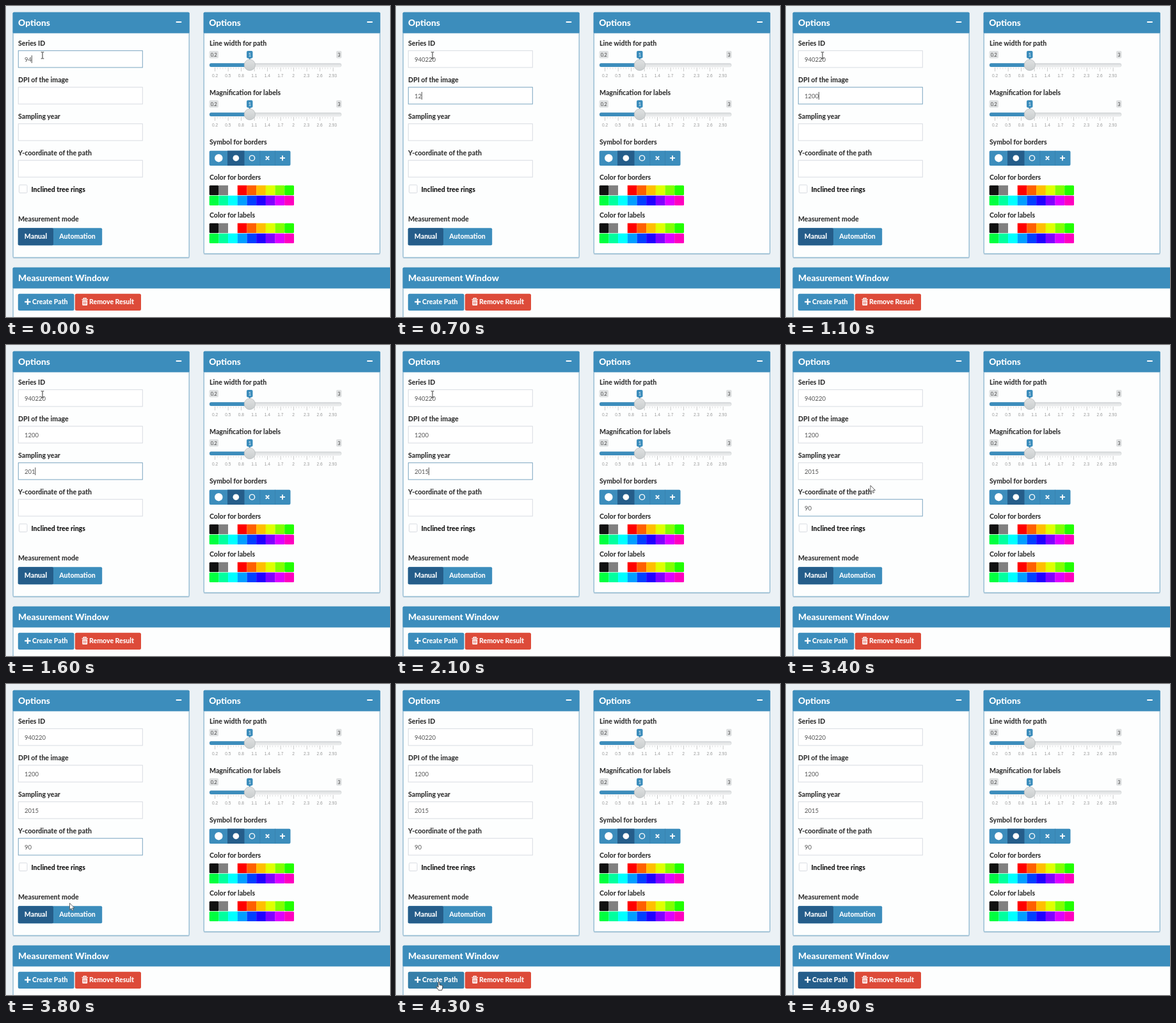
An HTML page that plays this animation: 600x485 px, repeating every 5 s.

```html
<!DOCTYPE html>
<html lang="en">
<head>
<meta charset="utf-8">
<title>Measurement options</title>
<style>
  html, body { margin: 0; width: 100%; height: 100%; overflow: hidden; background: #ebf1f5; }
  svg { display: block; width: 600px; height: 485px; }
  text { font: 800 10.55px Lato, "Open Sans", sans-serif; fill: #333; }
  .head { font-size: 13.8px; fill: #fff; }
  .light { fill: #fff; }
  .mid { text-anchor: middle; }
  .value { font-weight: 400; font-size: 9.5px; fill: #555; }
  .badge { font-weight: 400; font-size: 7.3px; fill: #444; }
  .tick { font: 400 6.6px "Liberation Sans", Arial, sans-serif; fill: #999; }
</style>
</head>
<body>
<svg id="stage" viewBox="0 0 600 485">
  <defs>
    <linearGradient id="knob" x2="0" y2="1">
      <stop offset="0" stop-color="#e0e2e2"/><stop offset="1" stop-color="#c9cdce"/>
    </linearGradient>
    <linearGradient id="rail" x2="0" y2="1">
      <stop offset="0" stop-color="#d3d6d8"/><stop offset="1" stop-color="#f3f4f4"/>
    </linearGradient>
  </defs>
</svg>
<script>
const NS = 'http://www.w3.org/2000/svg';
const stage = document.getElementById('stage');
const BLUE = '#3c8dbc', DARK = '#255d8a', HOVER = '#367fa9', LOOP = 5000;

function add(tag, attrs, parent = stage) {
  const el = document.createElementNS(NS, tag);
  for (const k in attrs) el.setAttribute(k, attrs[k]);
  return parent.appendChild(el);
}
const rect = (x, y, width, height, fill, more) => add('rect', { x, y, width, height, fill, ...more });
const path = (d, more, parent) => add('path', { d, fill: 'none', ...more }, parent);
function text(x, y, str, cls = '') {
  const el = add('text', { x, y, class: cls });
  el.textContent = str;
  return el;
}

function panel(x, y, w, h, title) {
  rect(x, y + 1, w, h, '#c3d3df', { rx: 1.5 });
  rect(x + .5, y + .5, w - 1, h - 1, '#fdfefe', { rx: 1.5, stroke: '#78abc8' });
  rect(x, y, w, 32.8, BLUE, { rx: 1.5 });
  text(x + 8.5, y + 21.2, title, 'head');
}
const minus = x => rect(x, 24, 8.5, 2, '#fff');

panel(10.6, 9.7, 276, 383, 'Options');
panel(308.7, 9.7, 276, 377, 'Options');
panel(10.6, 407.7, 620, 120, 'Measurement Window');
minus(265.7);
minus(564.2);

// Form fields
const fields = ['Series ID', 'DPI of the image', 'Sampling year', 'Y-coordinate of the path'].map((name, i) => {
  const top = 69.7 + i * 57;
  text(19, top - 8, name);
  return {
    top,
    box: rect(19.3, top, 194, 26.2, '#fff'),
    value: text(29, top + 17, '', 'value'),
    caret: rect(0, top + 7.3, 1, 12, '#555')
  };
});

rect(20.5, 279, 12.5, 12.5, '#fff', { rx: 1.5, stroke: '#d8dbe1' });
text(39.5, 290, 'Inclined tree rings').style.fill = '#111';
text(19, 336, 'Measurement mode');
rect(18.8, 346.3, 131.4, 27, BLUE, { rx: 2 });
rect(18.8, 346.3, 55.2, 27, DARK, { rx: 2 });
text(46.5, 363.4, 'Manual', 'light mid');
text(111.5, 363.4, 'Automation', 'light mid');

// Sliders
function slider(y, name) {
  text(318, y - 30, name);
  const badge = (x, w, str, fill) => {
    rect(x, y - 22, w, 11.5, fill, { rx: 2 });
    return text(x + w / 2, y - 13.5, str, 'badge mid');
  };
  badge(317.5, 14.5, '0.2', '#dfe1e2');
  badge(516, 8.5, '3', '#dfe1e2');
  badge(376, 9.5, '1', BLUE).style.fill = '#fff';
  path(`M378.5 ${y - 11}h4.5l-2.2 2.5z`, { fill: BLUE });
  rect(318, y - 2.5, 206, 5.3, 'url(#rail)', { rx: 2.5, stroke: '#d0d3d5', 'stroke-width': .6 });
  rect(318, y - 2.8, 62, 5.8, BLUE, { rx: 2.5 });
  for (let i = 0; i <= 45; i++) {
    const big = i % 5 === 0;
    rect(326.3 + i * 4.1, y + 4, .6, big ? 6 : 2.5, big ? '#aaa' : '#ccc');
  }
  '0.2 0.5 0.8 1.1 1.4 1.7 2 2.3 2.6 2.93'.split(' ').forEach((n, i) =>
    text(326.5 + i * 20.45, y + 19.3, n, 'tick mid'));
  add('circle', { cx: 380.8, cy: y, r: 8.6, fill: 'url(#knob)', stroke: '#b3b8ba', 'stroke-width': .8 });
}
slider(92, 'Line width for path');
slider(169, 'Magnification for labels');

// Symbol buttons
text(318, 215.5, 'Symbol for borders');
rect(317.7, 225.7, 126.8, 23.3, BLUE, { rx: 2 });
rect(346, 225.7, 26.5, 23.3, DARK);
for (const x of [396.5, 420]) rect(x, 225.7, .7, 23.3, HOVER);
add('circle', { cx: 332.3, cy: 237.2, r: 6.2, fill: '#fff' });
add('circle', { cx: 359.3, cy: 237.2, r: 4.8, fill: '#fff' });
add('circle', { cx: 384.5, cy: 237.2, r: 4.1, fill: 'none', stroke: '#fff', 'stroke-width': 1.4 });
path('M405.8 234.5l5.4 5.4m0 -5.4l-5.4 5.4M428 237.2h8m-4 -4v8', { stroke: '#fff', 'stroke-width': 1.8 });

// Palettes: three neutrals, then sixteenths of the hue wheel
const colors = ['#111', '#808080', '#fff'];
for (let i = 0; i < 15; i++) colors.push(`hsl(${i * 22.5} 100% 50%)`);
function palette(y, name) {
  text(318, y - 8.7, name);
  const cell = 132.2 / 9;
  colors.forEach((c, i) =>
    rect(317.7 + i % 9 * cell, y + (i > 8 ? 16 : 0), cell + .1, 15.3, c, { rx: i % 9 % 8 ? 0 : 1.5 }));
}
palette(279.7, 'Color for borders');
palette(338.7, 'Color for labels');

// Action buttons
const create = rect(18.8, 448.7, 87.7, 26.3, BLUE, { rx: 2.5 });
path('M29.2 461.3h9.4m-4.7 -4.7v9.4', { stroke: '#fff', 'stroke-width': 2.3 });
text(41, 465.4, 'Create Path', 'light');
rect(107.8, 448.7, 103.2, 26.3, '#dd4b39', { rx: 2.5 });
path('M118.5 457.6h9.4M121.3 457v-1.3h3.8v1.3', { stroke: '#fff', 'stroke-width': 1.3 });
path('M119.3 459h7.8v7q0 1 -1 1h-5.8q-1 0 -1 -1z', { fill: '#fff' });
path('M121.3 460.5v5m1.9 -5v5m1.9 -5v5', { stroke: '#dd4b39', 'stroke-width': .8 });
text(130, 465.4, 'Remove Result', 'light');

// Pointer shapes, hot spot at 0,0
const pointer = add('g', {});
const shapes = {
  beam: path('M-2.3 -5h1.6l.7 .6l.7 -.6h1.6M0 -4.4v8.8M-2.3 5h1.6l.7 -.6l.7 .6h1.6', { stroke: '#333' }, pointer),
  arrow: path('M0 0v10.2l2.4 -2.1l1.7 3.7l1.7 -.8l-1.6 -3.5h3.2z', { fill: '#fff', stroke: '#555', 'stroke-width': .9 }, pointer),
  hand: path('M-1 .7q1 -1.4 2 0v4l3.6 .8q1.5 .4 1.4 2l-.5 3l-.9 2.7h-5l-3.3 -5q-.5 -1.6 1 -1.3l1.7 1.5z',
    { fill: '#fff', stroke: '#333', 'stroke-width': .9 }, pointer)
};

// [time, field, content]
const typing = [
  [0, 0, '94'], [100, 0, '940'], [200, 0, '9402'], [300, 0, '94022'], [400, 0, '940220'],
  [500, 1, ''], [600, 1, '1'], [700, 1, '12'], [800, 1, '120'], [900, 1, '1200'],
  [1200, 2, ''], [1400, 2, '2'], [1500, 2, '20'], [1600, 2, '201'], [1700, 2, '2015'],
  [2200, 3, ''], [2800, 3, '9'], [2900, 3, '90']
];
const BLUR = 4200, PRESS = 4400, LEAVE = 4800;
const route = [[3100, 57, 77], [3400, 132, 219], [4200, 67, 464.5]];

function pointerAt(t) {
  if (t <= route[0][0]) return route[0].slice(1);
  for (let i = 1; i < route.length; i++) {
    const [t0, x0, y0] = route[i - 1], [t1, x1, y1] = route[i];
    if (t <= t1) {
      const k = (t - t0) / (t1 - t0), e = k * k * (3 - 2 * k);
      return [x0 + (x1 - x0) * e, y0 + (y1 - y0) * e];
    }
  }
  return route[route.length - 1].slice(1);
}

function draw(time) {
  const t = Math.floor(time % LOOP / 100) * 100;
  const content = ['', '', '', ''];
  let focus = 0, since = 0;
  for (const [at, i, str] of typing) {
    if (at > t) break;
    content[i] = str;
    focus = i;
    since = at;
  }
  if (t >= BLUR) focus = -1;
  const blinkOn = Math.floor((t - since) / 500) % 2 === 0;

  fields.forEach((f, i) => {
    const on = i === focus;
    f.value.textContent = content[i];
    f.box.setAttribute('stroke', on ? '#7ba5c0' : '#d8dbe1');
    f.caret.setAttribute('x', 28.8 + content[i].length * 5.51);
    f.caret.setAttribute('visibility', on && blinkOn ? 'visible' : 'hidden');
  });

  const [x, y] = pointerAt(t);
  const overField = x > 19 && x < 213 && fields.some(f => y > f.top && y < f.top + 26);
  const overButton = x > 19 && x < 106 && y > 449;
  const kind = overField ? 'beam' : overButton ? 'hand' : 'arrow';
  for (const k in shapes) shapes[k].setAttribute('display', k === kind ? 'inline' : 'none');
  pointer.setAttribute('transform', `translate(${x} ${y})`);
  pointer.setAttribute('visibility', t < LEAVE ? 'visible' : 'hidden');
  create.setAttribute('fill', t >= PRESS ? DARK : overButton ? HOVER : BLUE);
}

const start = performance.now();
function tick() {
  draw(performance.now() - start);
  requestAnimationFrame(tick);
}
tick();
</script>
</body>
</html>
```
